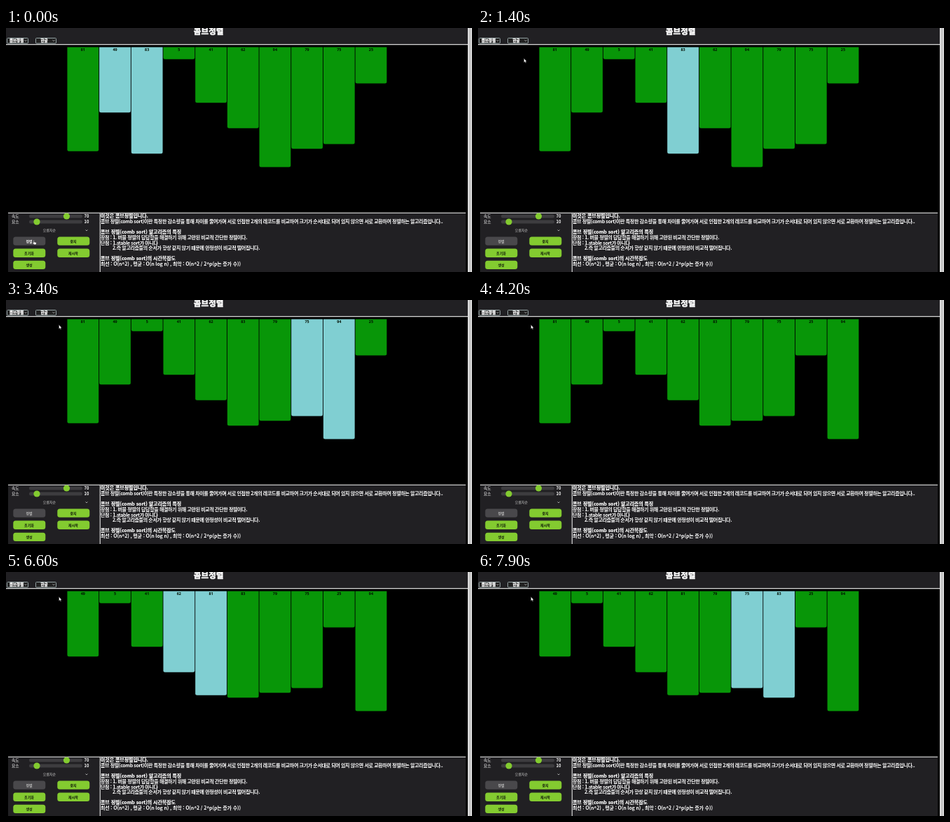
Write an HTML page that moves like this. It is 665 px wide and 350 px high and loops after 8000 ms.

```html
<!DOCTYPE html>
<html lang="ko">
<head>
<meta charset="utf-8">
<style>
  html, body { margin: 0; width: 100%; height: 100%; overflow: hidden; background: #000; }
  svg { display: block; width: 665px; height: 350px; font-family: "Noto Sans CJK KR", "Noto Sans CJK", "Noto Sans", sans-serif; fill: #fff; }
  .panel { fill: #212023; }
  .rule { fill: #d4d4d4; }
  .title { font-size: 11.6px; font-weight: 900; text-anchor: middle; stroke: #fff; stroke-width: .5; }
  .select rect { fill: #222; stroke: #94a3a4; }
  .select text { font-size: 5.5px; font-weight: 900; stroke: #fff; stroke-width: .3; }
  .chevron { fill: none; stroke: #ccc; stroke-width: .8; }
  .small { font-size: 5.8px; }
  .bold { font-weight: 700; }
  .track { fill: #3d3c3f; }
  .knob { fill: #83cb30; }
  .button rect { fill: #83cb30; }
  .button text { fill: #10180a; font-size: 5px; font-weight: 700; text-anchor: middle; }
  .button.off rect { fill: #49484b; }
  .button.off text { fill: #bdbdbd; }
  .button.off.hover text { fill: #fff; }
  .info text { font-size: 7px; font-weight: 700; letter-spacing: -.37px; }
  .info .head { font-weight: 900; letter-spacing: -.07px; stroke: #fff; stroke-width: .2; }
  .info .formula { letter-spacing: -.17px; }
  .bars path { fill: #089608; }
  .bars text { fill: #021002; font: 600 5.4px "Noto Sans", sans-serif; text-anchor: middle; }
  .bars .lit path { fill: #80cfd2; }
</style>
</head>
<body>
<svg viewBox="0 0 665 350">
  <rect width="665" height="350" fill="#000"/>
  <rect class="panel" width="659" height="23"/>
  <rect class="rule" y="23" width="659" height="1.3"/>
  <text class="title" x="289.2" y="9.3">콤브정렬</text>
  <g class="select">
    <rect x="1.5" y="14.5" width="30" height="7.5" rx="1"/>
    <text x="5" y="20.3">콤브정렬</text>
    <rect x="42.5" y="14.5" width="29" height="7.5" rx="1"/>
    <text x="49.5" y="20.3">한글</text>
  </g>
  <path class="chevron" d="M26.5 17.3l1.5 1.5 1.5-1.5M66.5 17.3l1.5 1.5 1.5-1.5"/>

  <g class="bars" id="bars"></g>

  <rect class="panel" x="3" y="265" width="653" height="85"/>
  <rect class="rule" x="3" y="264.7" width="653" height="1.2"/>
  <rect class="rule" x="133.7" y="265" width="1.2" height="85"/>
  <g id="controls">
    <text class="small" x="8" y="272.3">속도</text>
    <text class="small" x="8" y="280.3">요소</text>
    <rect class="track" x="33" y="267.5" width="76" height="5" rx="2.5"/>
    <rect class="track" x="33" y="275.5" width="76" height="5" rx="2.5"/>
    <circle class="knob" cx="86.5" cy="270" r="4.6"/>
    <circle class="knob" cx="44" cy="278" r="4.6"/>
    <text class="small bold" x="111.5" y="272.3">70</text>
    <text class="small bold" x="111.5" y="280.3">10</text>
    <text x="62" y="292" font-size="5" text-anchor="middle" fill="#ccc">오름차순</text>
    <path class="chevron" d="M113.5 289.5l1.5 1.5 1.5-1.5"/>
  </g>
  <g class="info" id="info"></g>

  <rect x="659" width="6" height="350" fill="#f0f0f0"/>
  <rect x="660" width="4.5" height="350" fill="#c9c9c9"/>
  <g id="cursor" stroke="#222" stroke-width=".5">
    <path id="arrow" d="M0 0V6L1.4 4.8L2.3 6.8L3.3 6.3L2.4 4.5H4Z"/>
    <path id="hand" d="M.2 0Q1-.6 1.3.2V2.5L4 3Q4.5 3.3 4.3 4.5L3.7 6.3H1L-1 3.7Q-1 3 .2 3.4Z"/>
  </g>
</svg>
<script>
const LOOP = 8000, LEFT = 87.45, PITCH = 45.68, TOP = 27.5;
const start = [81, 49, 83, 5, 41, 62, 94, 79, 75, 25];

// Comparisons: left index, time the previous pair fades, time lit, time swapped.
const comparisons = [
  [2, 100, 200, 500], [3, 700, 800, 1100], [4, 1400, 1500, 1700],
  [5, 2000, 2100], [6, 2400, 2500, 2700], [7, 3000, 3100, 3300],
  [8, 3600, 3700, 3900], [0, 4200, 4300, 4500], [1, 4800, 4900, 5200],
  [2, 5400, 5500, 5800], [3, 6100, 6200, 6400], [4, 6700, 6800],
  [5, 7000, 7100, 7300], [6, 7600, 7700, 7900]
];

const el = id => document.getElementById(id);
function add(parent, tag, attrs = {}, text = '') {
  const node = document.createElementNS('http://www.w3.org/2000/svg', tag);
  for (const key in attrs) node.setAttribute(key, attrs[key]);
  node.textContent = text;
  return parent.appendChild(node);
}

const [sortButton] = [
  ['정렬', 10, 299.5, 'off'], ['중지', 73, 299.5], ['초기화', 10, 316.6],
  ['재시작', 73, 316.6], ['생성', 10, 333.7]
].map(([label, x, y, state = '']) => {
  const g = add(el('controls'), 'g', { class: 'button ' + state });
  add(g, 'rect', { x: x + .3, y, width: 46, height: 12.3, rx: 3.5 });
  add(g, 'text', { x: x + 23, y: y + 8 }, label);
  return g;
});

[
  [0, '이것은 콤브정렬입니다.', 'head'],
  [1, '콤브 정렬(comb sort)이란 특정한 감소량을 통해 차이를 줄여가며 서로 인접한 2개의 레코드를 비교하여 크기가 순서대로 되어 있지 않으면 서로 교환하여 정렬하는 알고리즘입니다..'],
  [3, '콤브 정렬(comb sort) 알고리즘의 특징', 'head'],
  [4, '장점 : 1. 버블 정렬의 답답함을 해결하기 위해 고안된 비교적 간단한 정렬이다.'],
  [5, '단점 : 1.stable sort가 아니다'],
  [6, '2.즉 알고리즘들의 순서가 항상 같지 않기 때문에 안정성이 비교적 떨어집니다.', '', 17],
  [8, '콤브 정렬(comb sort)의 시간복잡도', 'head'],
  [9, '최선 : O(n^2) , 평균 : O(n log n) , 최악 : O(n^2 / 2^p(p는 증가 수))', 'formula']
].forEach(([row, text, cls = '', indent = 0]) =>
  add(el('info'), 'text', { x: 135 + indent, y: 272.4 + row * 7.62, class: cls }, text));

const bars = start.map(value => {
  const g = add(el('bars'), 'g'), h = 8.6 + 1.737 * value, w = PITCH - .9;
  add(g, 'path', { d: `M0 0H${w}V${h - 2.5}q0 2.5-2.5 2.5H2.5q-2.5 0-2.5-2.5Z` });
  add(g, 'text', { x: w / 2, y: 5.8 }, value);
  return g;
});

function stateAt(t) {
  const order = start.map((_, i) => i);
  let lit = [1, 2];
  for (const [j, off, on, swap = Infinity] of comparisons) {
    if (t >= off) lit = j ? [j] : [];
    if (t >= on) lit = [j, j + 1];
    if (t >= swap) [order[j], order[j + 1]] = [order[j + 1], order[j]];
  }
  return { order, lit };
}

function ease(t, from, to) {
  const p = Math.min(1, Math.max(0, (t - from) / (to - from)));
  return p * p * (3 - 2 * p);
}

function draw(now) {
  const t = now % LOOP, { order, lit } = stateAt(t);
  order.forEach((bar, slot) => {
    bars[bar].setAttribute('transform', `translate(${LEFT + slot * PITCH} ${TOP})`);
    bars[bar].setAttribute('class', lit.includes(slot) ? 'lit' : '');
  });
  const away = ease(t, 650, 1350), settle = ease(t, 1450, 1800);
  const x = 39 + 26.5 * away + 10 * settle, y = 304.5 - 261 * away - 8 * settle;
  const hovering = y > 299;
  el('cursor').setAttribute('transform', `translate(${x} ${y})`);
  el('hand').style.display = hovering ? '' : 'none';
  el('arrow').style.display = hovering ? 'none' : '';
  sortButton.classList.toggle('hover', hovering);
}

const began = performance.now();
function tick() {
  draw(performance.now() - began);
  requestAnimationFrame(tick);
}
tick();
</script>
</body>
</html>
```
